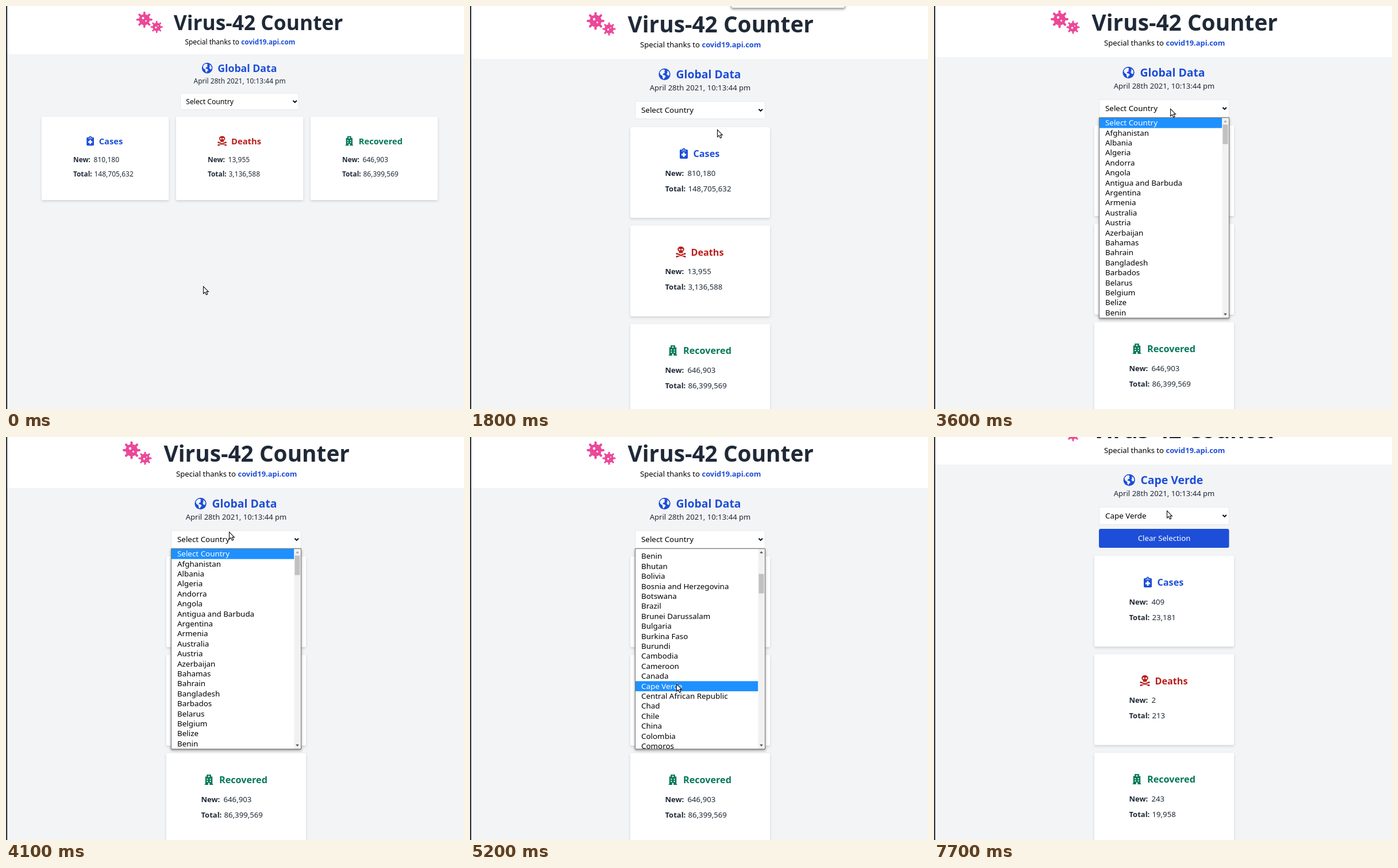
These frames come from a looping animation (797x702 px, 8 s). An HTML page:

```html
<!DOCTYPE html>
<html lang="en">
<head>
<meta charset="utf-8">
<title>Virus-42 Counter</title>
<style>
html, body { margin: 0; width: 100%; height: 100%; overflow: hidden; background: #f3f4f6; }
svg { display: block; font-family: "Noto Sans", "Open Sans", sans-serif; }
.card { fill: #fff; filter: drop-shadow(0 2px 2px rgba(0, 0, 0, .14)); }
.popup { fill: #fff; stroke: #777; filter: drop-shadow(0 2px 2px rgba(0, 0, 0, .4)); }
</style>
</head>
<body>
<svg id="stage" width="797" height="702" viewBox="0 0 797 702"></svg>
<script>
const stage = document.getElementById('stage');
const BLUE = '#1d4ed8', RED = '#b91c1c', GREEN = '#047857', PINK = '#ec4899', INK = '#1f2937', PAGE = '#f3f4f6';
const LOOP = 8000, STEP = 100, ROW = 17.4;

const countries = ('Select Country,Afghanistan,Albania,Algeria,Andorra,Angola,Antigua and Barbuda,Argentina,Armenia,' +
  'Australia,Austria,Azerbaijan,Bahamas,Bahrain,Bangladesh,Barbados,Belarus,Belgium,Belize,Benin,Bhutan,Bolivia,' +
  'Bosnia and Herzegovina,Botswana,Brazil,Brunei Darussalam,Bulgaria,Burkina Faso,Burundi,Cambodia,Cameroon,' +
  'Canada,Cape Verde,Central African Republic,Chad,Chile,China,Colombia,Comoros').split(',');

// Vertical positions; head, fresh and total are offsets inside a card
const wide = { k: .911, cx: 406.6, header: 84, title: 42, thanks: 67, place: 114.5, date: 135,
  select: 152, selectH: 28.5, card: 193, cardH: 145, head: 47.5, fresh: 79, total: 103.7, dx: 234, dy: 0 };
const narrow = { k: 1, cx: 400.5, header: 92, title: 46, thanks: 72, place: 126, date: 147,
  select: 166, selectH: 30.5, card: 211, cardH: 158, head: 52, fresh: 84.5, total: 111.7, dx: 0, dy: 171.5 };

// Keyframes: [time, ...values]
const mouseTrack = [[1300, 343, 488], [1800, 430, 215], [2200, 427, 181], [2800, 427, 181], [3000, 425, 187],
  [3300, 425, 187], [4100, 388, 165], [4200, 388, 165], [4700, 368, 320], [5100, 360, 376], [5200, 359, 430],
  [6000, 359, 430], [6300, 232, 371], [7200, 232, 371], [7700, 405, 128]];
const pageTrack = [[3400, 0], [3500, 3], [6800, 3], [7000, 44]];
const listTrack = [[4600, 0], [5100, 326.5]];

function at(track, t) {
  const next = track.findIndex(key => key[0] > t);
  if (next < 0) return track[track.length - 1].slice(1);
  if (!next) return track[0].slice(1);
  const a = track[next - 1], b = track[next], p = (t - a[0]) / (b[0] - a[0]);
  return a.slice(1).map((v, i) => v + (b[i + 1] - v) * p);
}

const text = (x, y, size, str, fill = INK, weight = 400, anchor = 'start') =>
  `<text x="${x}" y="${y}" font-size="${size}" fill="${fill}" font-weight="${weight}" text-anchor="${anchor}">${str}</text>`;
const rect = (x, y, w, h, fill, more = '') =>
  `<rect x="${x}" y="${y}" width="${w}" height="${h}" fill="${fill}" ${more}/>`;
const circle = (x, y, r, fill) => `<circle cx="${x}" cy="${y}" r="${r}" fill="${fill}"/>`;
const path = (d, fill, more = '') => `<path d="${d}" fill="${fill}" ${more}/>`;
const group = (x, y, k, body) => `<g transform="translate(${x} ${y}) scale(${k})">${body}</g>`;

function virus(r, holes) {
  let body = circle(0, 0, r * .68, PINK);
  for (let i = 0; i < 8; i++) {
    const a = i * Math.PI / 4, x = Math.cos(a) * r * .87, y = Math.sin(a) * r * .87;
    body += path(`M0 0L${x} ${y}`, 'none', `stroke="${PINK}" stroke-width="${r * .26}" stroke-linecap="round"`);
  }
  return body + holes.map(h => circle(h[0], h[1], h[2], '#fff')).join('');
}

const globe = circle(0, 0, 10.2, BLUE) +
  path('M-8.3-3.5L-5-7.5L-1-8.4L1.2-6.5L-.5-4.8L1-3L-2-1.2L-3.2.8L.6 1.8L2.2 4L-.2 6.2L-1.2 8.8L-3.2 6.5L-3.6 3L-7.2.6Z' +
    'M4-6.5L7.4-4.6L8.6-1.2L7.8 2.6L5.2 1.8L3.8-1L5.2-3.4Z', PAGE);

const clipboard = rect(-7, -7, 14, 16, BLUE, 'rx="1.8"') + circle(0, -6.8, 2.6, BLUE) + circle(0, -6.8, .9, '#fff') +
  path('M-3.8-4.6H3.8', 'none', 'stroke="#fff" stroke-width=".8"') +
  path('M-4 2H4M0-2V6', 'none', 'stroke="#fff" stroke-width="2.8"');

const skull = `<ellipse cy="-4.6" rx="5.8" ry="4.8" fill="${RED}"/>` + rect(-3.3, -2, 6.6, 4, RED, 'rx=".8"') +
  circle(-2.3, -4.2, 1.5, '#fff') + circle(2.3, -4.2, 1.5, '#fff') +
  path('M-7 3L7 8M-7 8L7 3', 'none', `stroke="${RED}" stroke-width="2.2" stroke-linecap="round"`) +
  [-7, 7].map(x => circle(x, 2.9, 1.5, RED) + circle(x, 7.9, 1.5, RED)).join('');

const hospital = path('M-3.8-9H3.8V-5.5H6.2V7.4H7.3V9H-7.3V7.4H-6.2V-5.5H-3.8Z', GREEN) +
  path('M-1.7-5.8H1.7M0-7.5V-4.1', 'none', 'stroke="#fff" stroke-width="1.1"') +
  [-3.6, 1.6].map(x => rect(x, -1.8, 2, 2, '#fff') + rect(x, 2, 2, 2, '#fff')).join('') +
  rect(-1.2, 5.6, 2.4, 3.4, '#fff');

const cards = [
  { name: 'Cases', x: -12, icon: clipboard, iconX: -28.5, color: BLUE, world: ['810,180', '148,705,632'], local: ['409', '23,181'] },
  { name: 'Deaths', x: -16, icon: skull, iconX: -33.5, color: RED, world: ['13,955', '3,136,588'], local: ['2', '213'] },
  { name: 'Recovered', x: -29.5, icon: hospital, iconX: -47.5, color: GREEN, world: ['646,903', '86,399,569'], local: ['243', '19,958'] }
];

function card(c, i, L, local) {
  const k = L.k, x = L.cx + (i - 1) * L.dx, y = L.card + i * L.dy + (local ? 40 : 0);
  const values = local ? c.local : c.world;
  const line = (dy, label, value, vx) =>
    text(x - 61 * k, y + dy, 13 * k, label, INK, 700) + text(x + vx * k, y + dy, 13.2 * k, value);
  return rect(x - 121.5 * k, y, 243 * k, L.cardH, '#fff', 'rx="2.5" class="card"') +
    group(x + c.iconX * k, y + L.head - 6 * k, k, c.icon) +
    text(x + c.x * k, y + L.head, 16.2 * k, c.name, c.color, 700) +
    line(L.fresh, 'New:', values[0], -22) + line(L.total, 'Total:', values[1], -21);
}

function dropdown(y, offset, active) {
  const rows = countries.map((name, i) => {
    const top = i * ROW - offset;
    return (i === active ? rect(0, top, 213.5, ROW + .2, '#1e90ff') : '') +
      text(10, top + 13.2, 13.4, name, i === active ? '#fff' : '#000');
  }).join('');
  return rect(287.5, y, 226, 349, '#fff', 'class="popup"') +
    `<svg x="288" y="${y + .5}" width="213.5" height="348">${rows}</svg>` +
    rect(501.5, y + .5, 11.5, 348, '#f1f1f1') +
    rect(502.5, y + 12 + offset * .098, 9, 34, '#c1c1c1') +
    path(`M504 ${y + 8}h6l-3-3.5z`, offset ? '#505050' : '#a3a3a3') +
    path(`M504 ${y + 341}h6l-3 3.5z`, '#505050');
}

function page(t, scroll, mouseY) {
  const L = t < 500 ? wide : narrow, { k, cx } = L;
  const local = t >= 5900, open = t >= 2300 && t < 5800, ring = t >= 5800 && t < 6600;
  const mid = L.select + L.selectH / 2;
  let out = rect(0, 0, 797, L.header, '#fff') +
    group(cx - 182 * k, L.title - 20 * k, k, virus(15.5, [[-2.5, -3, 2.2], [3, 2.5, 1.5]])) +
    group(cx - 158.5 * k, L.title - 6 * k, k, virus(11.6, [[-1.5, 1, 1.8], [2.8, -2, 1]])) +
    text(cx - 126 * k, L.title, 38.8 * k, 'Virus-42 Counter', INK, 700) +
    text(cx - 104.5 * k, L.thanks, 13.1 * k, 'Special thanks to', '#000') +
    text(cx + 3 * k, L.thanks, 12.9 * k, 'covid19.api.com', BLUE, 600) +
    group(cx + (local ? -60.8 : -62) * k, L.place - 7 * k, k, globe) +
    text(cx + (local ? -41 : -42) * k, L.place, 19.4 * k, local ? 'Cape Verde' : 'Global Data', BLUE, 700) +
    text(cx, L.date, 13.1 * k, 'April 28th 2021, 10:13:44 pm', INK, 400, 'middle') +
    rect(cx - 113 * k, L.select, 226 * k, L.selectH, '#fff',
      `rx="3" stroke="${ring ? '#101010' : '#e5e7eb'}" stroke-width="${ring ? 1.6 : 1}"`) +
    text(cx - 102.5 * k, mid + 5 * k, 13.4 * k, t >= 5800 ? 'Cape Verde' : 'Select Country', '#000') +
    path(`M${cx + 102 * k} ${mid - 1.5}l3.2 3.2l3.2-3.2`, 'none', 'stroke="#000" stroke-width="1.8"');
  if (local) {
    out += rect(cx - 113.5, 204, 226.5, 33, BLUE, 'rx="3"') +
      text(cx, 225, 13.2, 'Clear Selection', '#fff', 400, 'middle');
  }
  out += cards.map((c, i) => card(c, i, L, local)).join('');
  if (open) {
    const [offset] = at(listTrack, t), inside = mouseY + scroll - 198;
    out += dropdown(197.5, offset, inside < 0 ? 0 : Math.floor((inside + offset) / ROW));
  }
  return group(0, -scroll, 1, out);
}

function render(t) {
  const [x, y] = at(mouseTrack, t), [scroll] = at(pageTrack, t);
  const bubble = t >= 600 && t < 2000;
  stage.innerHTML = rect(0, 0, 797, 702, PAGE) + page(t, scroll, y) +
    (bubble ? rect(454.5, -40, 198, 43.5, '#fff', 'rx="3" class="popup" stroke-opacity=".5"') : '') +
    rect(0, 0, 2.2, 702, '#2d3540') +
    group(x, y, 1, path('M.5.5V13L3.4 10.4L5.5 15L7.8 14L5.8 9.6H9.4Z', '#fff', 'stroke="#111" stroke-width="1.1"'));
}

let shown = -1;
function tick() {
  const t = Math.floor(performance.now() % LOOP / STEP) * STEP;
  if (t !== shown) render(shown = t);
  requestAnimationFrame(tick);
}
tick();
</script>
</body>
</html>
```
